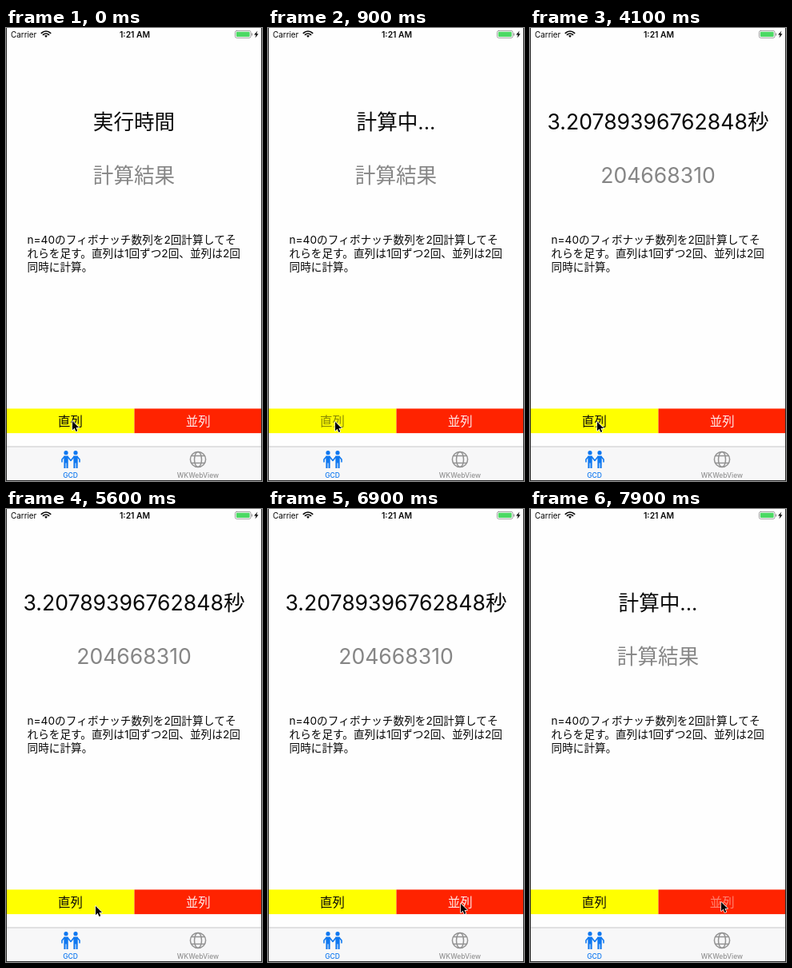
Recreate the animation shown at these times as an HTML page with a canvas. Size 320 by 567 pixels, loop 8 s.

```html
<!DOCTYPE html>
<html lang="ja">
<head>
<meta charset="utf-8">
<style>
html, body { margin: 0; width: 100%; height: 100%; overflow: hidden; background: #fefefe; }
canvas { display: block; width: 320px; height: 567px; }
</style>
</head>
<body>
<canvas id="stage" width="320" height="567"></canvas>
<script>
const ctx = document.getElementById('stage').getContext('2d');
const LOOP = 8000, STEP = 100;
const FONT = 'Inter, "Noto Sans CJK JP", "Noto Sans CJK", sans-serif';
const BLUE = '#0f78f0', GRAY = '#929292', INK = '#080808', EDGE = '#2a2a2a';

// Pointer tip: [time, x, y]
const PATH = [
  [0, 83, 492], [400, 83, 492], [500, 84, 493], [5500, 84, 493],
  [5600, 112, 497], [5700, 190, 505], [5800, 262, 508], [5900, 287, 508],
  [6000, 287, 508], [6200, 304, 511], [6300, 292, 511], [6400, 277, 510],
  [6600, 255, 503], [6900, 241, 494], [7100, 239, 492], [8000, 239, 492]
];

function pointerAt(t) {
  const i = Math.max(1, PATH.findIndex(p => p[0] >= t));
  const [t0, x0, y0] = PATH[i - 1], [t1, x1, y1] = PATH[i];
  const k = (t - t0) / (t1 - t0);
  return [x0 + (x1 - x0) * k, y0 + (y1 - y0) * k];
}

// Title dims at once on press and eases back after release.
function titleAlpha(t, press, release) {
  if (t < press) return 1;
  const left = 1 - Math.min(1, Math.max(0, (t - release) / 500));
  return 1 - 0.8 * left * left;
}

function text(str, x, y, size, color, align = 'center', weight = 400) {
  ctx.font = `${weight} ${size}px ${FONT}`;
  ctx.textAlign = align;
  ctx.fillStyle = color;
  ctx.fillText(str, x, y);
}

function rect(x, y, w, h, color) {
  ctx.fillStyle = color;
  ctx.fillRect(x, y, w, h);
}

function shape(d, x, y, color) {
  ctx.save();
  ctx.translate(x, y);
  ctx.fillStyle = color;
  ctx.fill(new Path2D(d));
  ctx.restore();
}

function stroke(d, color, width) {
  ctx.strokeStyle = color;
  ctx.lineWidth = width;
  ctx.stroke(new Path2D(d));
}

function statusBar() {
  text('Carrier', 6, 11.5, 9.9, INK, 'left');
  text('1:21 AM', 161, 11.5, 10.3, INK, 'center', 600);

  ctx.strokeStyle = INK;
  ctx.lineWidth = 1.7;
  for (const r of [5, 8]) {
    ctx.beginPath();
    ctx.arc(50, 12, r, -Math.PI * 0.75, -Math.PI * 0.25);
    ctx.stroke();
  }
  shape('M0 0L-2 -2.4Q0 -3.8 2 -2.4Z', 50, 12, INK);

  ctx.strokeStyle = '#8a8a8a';
  ctx.lineWidth = 0.8;
  ctx.beginPath();
  ctx.roundRect(286.4, 3.4, 19.6, 9, 2);
  ctx.stroke();
  ctx.fillStyle = '#4cd964';
  ctx.beginPath();
  ctx.roundRect(287.8, 4.8, 16.8, 6.2, 1);
  ctx.fill();
  rect(307, 6.5, 1, 3, '#8a8a8a');
  shape('M2 0L-2.5 5H0L-1 9L3 3.8H0.6Z', 312.5, 3.5, INK);
}

function person(x) {
  ctx.fillStyle = BLUE;
  ctx.beginPath();
  ctx.arc(x, 531.7, 2.6, 0, 7);
  ctx.fill();
  shape('M-2.7 0H2.7V7L2.6 15.5H0.5V9H-0.5V15.5H-2.6V7Z', x, 535.5, BLUE);
}

function tabBar() {
  rect(1, 524, 319, 43, '#f7f7f8');
  rect(1, 523.5, 319, 1, '#c8c8ca');
  person(75);
  person(87);
  ctx.lineCap = 'round';
  ctx.lineJoin = 'round';
  stroke('M73 536.5L70 540V543M77 536.5L81 541.5L85 536.5M89 536.5L92 540V543', BLUE, 1.6);
  text('GCD', 80.5, 563, 8.5, BLUE, 'center', 500);

  ctx.strokeStyle = GRAY;
  ctx.lineWidth = 1.5;
  for (const rx of [9.6, 4.5]) {
    ctx.beginPath();
    ctx.ellipse(240, 540, rx, 9.6, 0, 0, 7);
    ctx.stroke();
  }
  stroke('M232 535.5H248M232 544.5H248', GRAY, 1.4);
  text('WKWebView', 240, 563, 8.5, GRAY, 'center', 500);
}

function button(label, x, w, fill, color, alpha) {
  rect(x, 476.4, w, 30.7, fill);
  ctx.globalAlpha = alpha;
  text(label, x + w / 2, 497.6, 15.4, color);
  ctx.globalAlpha = 1;
}

function pointer(x, y) {
  const d = 'M0 0V11.2L2.6 8.8L4.4 13L6.3 12.2L4.5 8.1H8Z';
  ctx.save();
  ctx.translate(x, y);
  ctx.lineJoin = 'round';
  stroke(d, '#fff', 1.5);
  ctx.restore();
  shape(d, x, y, '#000');
}

function labels(t) {
  const running = (t >= 800 && t < 4100) || t >= 7800;
  const done = t >= 4100 && t < 7800;
  const size = done ? 26.6 : 25.6;
  const time = running ? '計算中...' : done ? '3.20789396762848秒' : '実行時間';
  text(time, 160, 127, size, INK);
  text(done ? '204668310' : '計算結果', 160, 193.5, size, '#868686');
  [
    'n=40のフィボナッチ数列を2回計算してそ',
    'れらを足す。直列は1回ずつ2回、並列は2回',
    '同時に計算。'
  ].forEach((line, i) => text(line, 26.5, 269.7 + i * 17.07, 13.65, INK, 'left'));
}

function draw(t) {
  rect(0, 0, 320, 567, '#fefefe');
  statusBar();
  labels(t);
  button('直列', 0.5, 160, '#ffff00', INK, titleAlpha(t, 600, 800));
  button('並列', 160.5, 159.5, '#ff2300', '#ffeaea', titleAlpha(t, 7600, 7800));
  tabBar();
  rect(0, 0, 1, 567, EDGE);
  rect(319, 0, 1, 567, EDGE);
  rect(0, 566, 320, 1, EDGE);
  pointer(...pointerAt(t));
}

const start = performance.now();
function tick() {
  const t = (performance.now() - start) % LOOP;
  draw(Math.floor(t / STEP) * STEP);
  requestAnimationFrame(tick);
}
tick();
</script>
</body>
</html>
```
